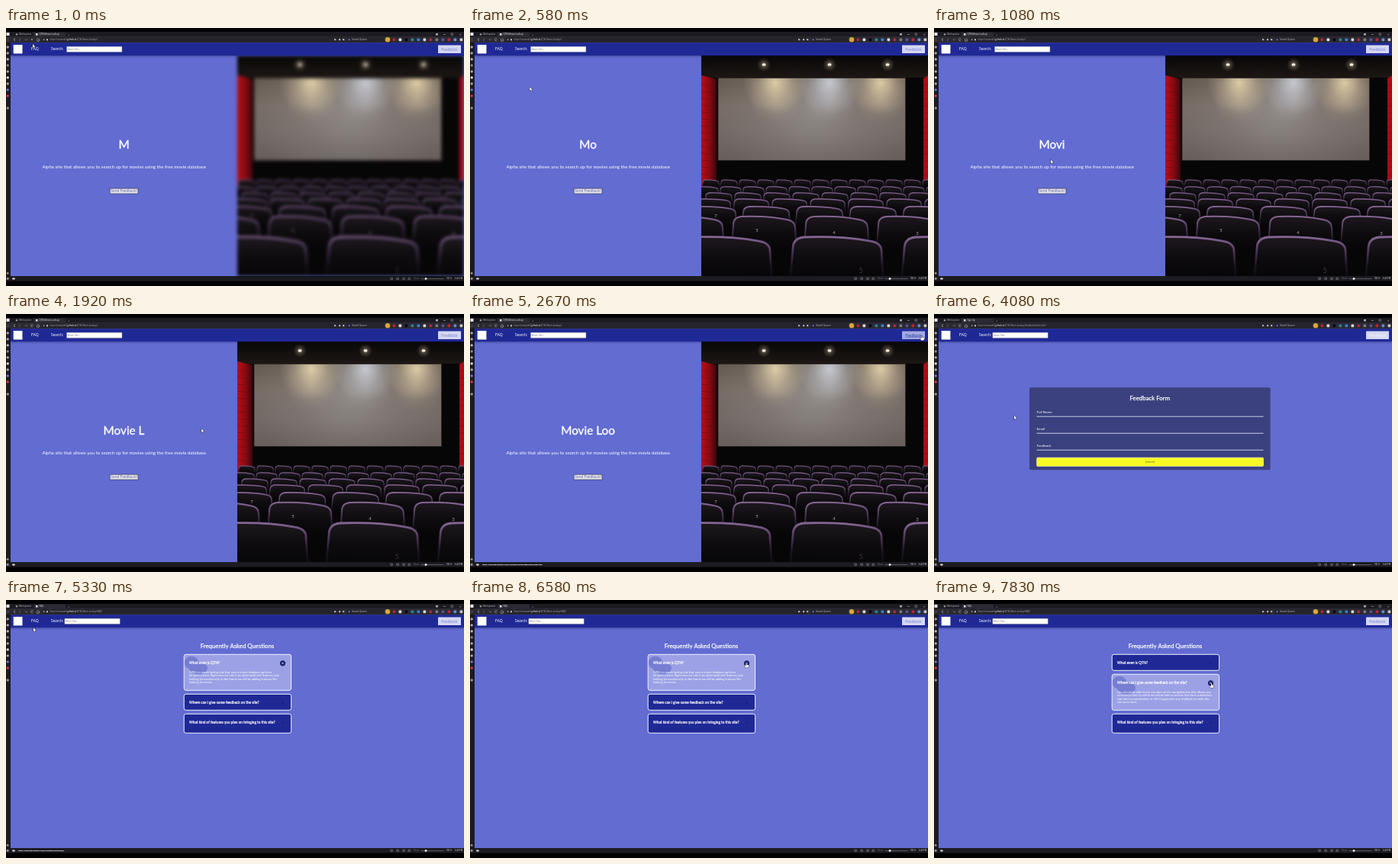
Write an HTML page with a canvas that moves like this. It is 600x338 px and loops after 8000 ms.

```html
<!DOCTYPE html>
<html lang="en">
<head>
<meta charset="utf-8">
<title>Movie Lookup</title>
<style>
html, body { margin: 0; width: 100%; height: 100%; overflow: hidden; background: #000; }
canvas { display: block; width: 100vw; height: 100vh; }
</style>
</head>
<body>
<canvas id="stage"></canvas>
<script>
const W = 600, H = 338, LOOP = 8000;
const SHARP_AT = 350, FEEDBACK_AT = 2950, FAQ_AT = 5150, CLOSE_AT = 6820, OPEN_AT = 7480;
const SITE = '/QTN-Movie-Lookup/', HEADLINE = 'Movie Lookup';
const PAGE = '#626cd1', NAVY = '#1f2996';
const UI = '"Open Sans", sans-serif', BODY = 'Lato, sans-serif';

const canvas = document.getElementById('stage');
const scale = window.devicePixelRatio || 1;
canvas.width = W * scale;
canvas.height = H * scale;
let c = canvas.getContext('2d');
c.scale(scale, scale);

function rect(x, y, w, h, fill) {
  c.fillStyle = fill;
  c.fillRect(x, y, w, h);
}

function box(x, y, w, h, r, fill, stroke, line = 1) {
  c.beginPath();
  c.roundRect(x, y, w, h, r);
  if (fill) { c.fillStyle = fill; c.fill(); }
  if (stroke) { c.strokeStyle = stroke; c.lineWidth = line; c.stroke(); }
}

function disc(x, y, r, fill, ry = r) {
  c.fillStyle = fill;
  c.beginPath();
  c.ellipse(x, y, r, ry, 0, 0, 7);
  c.fill();
}

function path(points, stroke, line) {
  c.beginPath();
  points.forEach(([x, y]) => c.lineTo(x, y));
  c.strokeStyle = stroke;
  c.lineWidth = line;
  c.stroke();
}

function polygon(points, fill) {
  c.fillStyle = fill;
  c.beginPath();
  points.forEach(([x, y]) => c.lineTo(x, y));
  c.fill();
}

// "heavy" thickens the regular weight without changing its widths
function text(str, x, y, size, color, { align = 'left', font = BODY, heavy = 0 } = {}) {
  c.font = `${size}px ${font}`;
  c.textAlign = align;
  c.fillStyle = color;
  c.fillText(str, x, y);
  if (heavy) {
    c.strokeStyle = color;
    c.lineWidth = heavy;
    c.lineJoin = 'round';
    c.strokeText(str, x, y);
  }
  return c.measureText(str).width;
}

// ---- cinema picture, drawn once ----
function gradient(x0, y0, x1, y1, ...colors) {
  const g = c.createLinearGradient(x0, y0, x1, y1);
  colors.forEach((color, i) => g.addColorStop(i / (colors.length - 1), color));
  return g;
}

function glow(x, y, r, rgb, alpha) {
  const g = c.createRadialGradient(x, y, 0, x, y, r);
  g.addColorStop(0, `rgba(${rgb},${alpha})`);
  g.addColorStop(0.5, `rgba(${rgb},${alpha * 0.35})`);
  g.addColorStop(1, `rgba(${rgb},0)`);
  rect(x - r, y - r, 2 * r, 2 * r, g);
}

function seat(x, y, w, h) {
  const r = w * 0.13, right = x + w;
  c.beginPath();
  c.moveTo(x - w * 0.03, y + h);
  c.lineTo(x, y + r);
  c.quadraticCurveTo(x, y + 1, x + r, y);
  c.quadraticCurveTo(x + w * 0.55, y - h * 0.03, right - r, y + h * 0.09);
  c.quadraticCurveTo(right, y + h * 0.13, right, y + h * 0.32);
  c.lineTo(right + w * 0.02, y + h);
  c.fillStyle = gradient(0, y, 0, y + h, '#1d181e', '#0d0b0e', '#060506');
  c.fill();
  c.strokeStyle = gradient(0, y, 0, y + h, '#866594', '#4a3656', '#1a141e', '#0d0a0f');
  c.lineWidth = 0.7 + w * 0.018;
  c.stroke();
}

function drawCinema() {
  rect(303, 36, 297, 289, '#070607');
  rect(303, 36, 297, 29, gradient(0, 36, 0, 65, '#080707', '#1d1714'));
  polygon([[303, 62], [323, 67], [323, 200], [303, 207]], gradient(303, 0, 323, 0, '#b80e17', '#8c0b12', '#3a070a'));
  polygon([[594, 66], [600, 62], [600, 210], [594, 204]], '#a80d17');
  for (let y = 76; y < 200; y += 9) {
    path([[303, y - 2], [320, y]], '#740910', 0.6);
    path([[594, y], [600, y - 2]], '#740910', 0.6);
  }
  c.save();
  c.beginPath();
  c.rect(325, 65.5, 245.5, 108);
  c.clip();
  rect(325, 65, 246, 109, gradient(0, 65, 0, 174, '#64594f', '#776c65', '#736a66', '#675e5b'));
  glow(450, 105, 125, '165,162,160', 0.55);
  [[400, '238,218,176'], [471, '208,213,224'], [538, '238,218,176']].forEach(([x, rgb]) => {
    glow(x, 72, 42, rgb, 0.85);
    glow(x, 92, 36, rgb, 0.3);
  });
  c.restore();
  box(325, 65.5, 245.5, 108, 0, null, '#2b2524', 0.8);
  [385, 471, 547].forEach(x => {
    glow(x, 48, 9, '240,220,190', 0.5);
    disc(x, 48, 2.5, '#fff3dc', 1.8);
  });
  // top, pitch, width, height, first x
  [[199, 24, 21, 13, 305], [208, 30, 27, 15, 298], [216, 38, 34, 17, 309],
   [224, 50, 45, 20, 296], [234, 70, 60, 28, 288], [247, 95, 81, 46, 250],
   [274, 146, 116, 56, 277]].forEach(([y, pitch, w, h, first]) => {
    for (let x = first; x < 600; x += pitch) seat(x, y, w, h);
  });
  [['7', 322, 248], ['5', 376, 267], ['4', 477, 270], ['3', 586, 271]].forEach(([n, x, y]) =>
    text(n, x, y, 6, '#aaa5ae', { align: 'center' }));
  text('5', 512, 321, 9, '#39343d', { align: 'center' });
}

function cinemaLayer(source) {
  const layer = document.createElement('canvas');
  layer.width = canvas.width;
  layer.height = canvas.height;
  const main = c;
  c = layer.getContext('2d');
  if (source) {
    c.filter = `blur(${2 * scale}px)`;
    c.drawImage(source, 0, 0);
  } else {
    c.scale(scale, scale);
    c.beginPath();
    c.rect(303, 36, 297, 289);
    c.clip();
    drawCinema();
  }
  c = main;
  return layer;
}
const sharpCinema = cinemaLayer(), softCinema = cinemaLayer(sharpCinema);

// ---- browser frame ----
function address(x, y, size, tail, color, heavy = 0) {
  const parts = [['https://orvandell.', color], ['github.io', '#fff'], [SITE + tail, color]];
  for (const [part, fill] of parts) x += text(part, x, y, size, fill, { font: UI, heavy });
}

function drawBrowser(page, t, status) {
  const ui = { font: UI }, grey = '#b9b9c2';
  rect(0, 0, W, H, '#000');
  rect(0, 5, W, 6, '#1c1b22');
  rect(0, 11, W, 8.5, '#2b2a33');
  rect(0, 19.5, 6, 312, '#1c1b22');
  rect(0, 325, W, 6.5, '#1c1b22');

  rect(0.5, 6, 4, 4, '#e7e7ea');
  rect(36, 5.5, 42, 5.5, '#2b2a33');
  disc(14, 8.2, 1.2, '#999');
  text('Workspaces', 17, 9.3, 2.9, grey, ui);
  rect(39, 7, 2.6, 2.6, '#ddd');
  text({ home: 'QTN-Movie-Lookup', feedback: 'Sign Up', faq: 'FAQ' }[page], 43.5, 9.3, 2.9, '#f3f3f5', ui);
  text('+', 81, 9.5, 4, grey, ui);
  rect(563, 7, 3, 2.5, '#aaa');
  rect(573, 8.4, 3, 0.5, '#ccc');
  box(583, 7, 2.4, 2.4, 0, null, '#ccc', 0.4);
  text('×', 594, 9.8, 4, '#ddd', ui);

  text('‹', 2, 17, 5, grey, ui);
  path([[12, 13.5], [10, 15.3], [12, 17]], '#ddd', 0.6);
  path([[17, 13.5], [19, 15.3], [17, 17]], '#777', 0.6);
  path([[25, 14.5], [26.5, 16.2], [28, 14.5]], grey, 0.5);
  if (t < SHARP_AT) text('×', 32.5, 17, 5, '#ddd', ui);
  else {
    c.beginPath();
    c.arc(34, 15.3, 1.5, 0.5, 6);
    c.strokeStyle = '#ddd';
    c.lineWidth = 0.5;
    c.stroke();
  }
  path([[40, 15.5], [42, 13.5], [44, 15.5], [43.3, 15.5], [43.3, 17.2], [40.7, 17.2], [40.7, 15.5]], '#ddd', 0.5);
  box(47, 12, 396, 6.6, 1, '#25242c');
  disc(49.7, 15.3, 1, '#999');
  rect(53, 14.2, 2, 2.2, '#bbb');
  address(57.5, 16.4, 2.85, { home: '', feedback: 'feedback/index.html', faq: 'FAQ/' }[page], '#a7a7b0');
  [431, 437, 442].forEach(x => rect(x - 1, 14.2, 2.2, 2, grey));
  box(446, 12, 49, 6.6, 1, '#25242c');
  disc(449.5, 15.3, 1.1, '#6a7ccc');
  text('Search Quovin', 453, 16.4, 2.9, '#c9c9d0', ui);
  disc(500, 15.3, 3.2, '#d9a63b');
  ['#a52830', '#dedee2', '#08080a', '#24869b', '#4279c9', '#d6d7e2', '#b62430', '#777984', '#4a579a',
   '#b32736', '#5c8ee8', '#c7c7ce'].forEach((color, i) => box(506.5 + i * 8, 13.6, 3.7, 3.7, 1, color));

  ['#aaa', '#aaa', '#bbb', '#888', '#aaa', '#ddd', '#aaa', '#617bdc', '#e6324b', null, '#999']
    .forEach((color, i) => color && box(0.8, 23.4 + i * 8, 3, 3, 1, color));
  disc(2.2, 321.3, 1.4, '#999');
  rect(0.8, 327, 2.8, 2.6, '#999');
  disc(10, 328.4, 1.8, '#ddd', 1.2);
  if (status) address(16, 329.4, 2.5, status, '#fff', 0.15);
  [505, 513, 521, 528].forEach(x => box(x - 1.2, 327.2, 2.6, 2.2, 0.3, null, '#bbb', 0.5));
  text('Reset', 534, 329.4, 2.7, '#777', ui);
  rect(543.5, 328.2, 30, 0.6, '#888');
  disc(550, 328.5, 1.4, '#eee');
  text('100 %', 576.5, 329.4, 2.7, '#ddd', ui);
  text('6:40 PM', 588, 329.4, 2.7, '#ddd', ui);
}

// ---- site ----
function drawNav(page, hover) {
  c.save();
  c.shadowColor = 'rgba(15,18,70,.6)';
  c.shadowBlur = 3 * scale;
  c.shadowOffsetY = scale;
  rect(6, 19.5, 594, 16.5, NAVY);
  c.restore();
  rect(9.7, 22, 11.8, 11.5, '#fff');
  text('FAQ', 33, 29.2, 4.9, '#fff');
  text('Search:', 59, 29.2, 5, '#fff');
  const x = page === 'home' ? 79.5 : 76.8;
  box(x, 24.2, 72.5, 7.2, 0.4, '#fff', '#777', 0.4);
  text('Movie Title...', x + 1.2, 28.8, 2.8, '#777', { font: UI });
  box(566, 22.4, 30, 10.7, 0.5, hover ? '#a3aae2' : '#d5d8f2');
  text('Feedback', 581, 29.7, 5.1, hover ? '#303aa0' : page === 'feedback' ? '#f2f3fc' : '#7983d1', { align: 'center' });
  if (hover) rect(570.3, 30.4, 21.4, 0.4, '#303aa0');
}

function drawHome(t) {
  const center = { align: 'center' };
  const typed = HEADLINE.slice(0, 1 + Math.floor(t / 300));
  text(typed, 154.5, 158.4, 15.3, '#fff', { ...center, heavy: 0.35 });
  text('Alpha site that allows you to search up for movies using the free movie database',
    154.7, 183.8, 6.12, '#fff', center);
  box(136.2, 210.2, 36.8, 6.8, 0.4, '#e6e6ee', '#2d2d42', 0.6);
  text('Send Feedback!', 154.6, 215.4, 5, '#656b9e', center);
  c.drawImage(t < SHARP_AT ? softCinema : sharpCinema, 0, 0, W, H);
}

function drawFeedback() {
  box(125, 96.2, 315.6, 108, 2, '#3b417f');
  text('Feedback Form', 282.8, 113.3, 7.85, '#fff', { align: 'center', heavy: 0.25 });
  ['Full Name', 'Email', 'Feedback'].forEach((label, i) => {
    text(label, 134.5, 130 + i * 22, 4.6, '#fff');
    rect(134.5, 133.8 + i * 22, 297, 0.8, '#e9e9f2');
  });
  box(134.7, 188.2, 296.8, 11.2, 1.2, '#f7f922', '#fdfec0', 0.7);
  text('Submit', 283, 195.4, 4, '#77782c', { align: 'center' });
}

const questions = [
  { title: 'What even is QTN?', closed: 21, answer: [
    'QTN is a movie lookup site that uses a movie database api from',
    'an open source. Right now our site is an alpha build and features only',
    'looking for movies only. In the future we will be adding features like',
    'looking for actors.'] },
  { title: 'Where can I give some feedback on the site?', closed: 21, answer: [
    'You should be able to see a button on the navigation bar that allows you',
    'to access a form in which we will be able to receive that form submission',
    "and take in consideration it. We'd appreciate any feedback to make this",
    'site more nicer.'] },
  { title: 'What kind of features you plan on bringing to this site?', closed: 25 }
];

function drawFaq(t) {
  text('Frequently Asked Questions', 303, 62.5, 7.8, '#fff', { align: 'center', heavy: 0.25 });
  const openItem = t < CLOSE_AT ? 0 : t < OPEN_AT ? -1 : 1;
  let y = 71.3;
  questions.forEach(({ title, closed, answer }, i) => {
    const open = i === openItem, h = open ? 47 : closed;
    box(233.2, y, 140.4, h, 2.5, open ? '#9ba1e4' : NAVY);
    if (open) {
      c.save();
      c.clip();
      disc(243, y + 11, 9.5, '#767ed2', 8.5);
      disc(252, y + 18, 12, '#767ed2', 8);
      c.restore();
    }
    box(233.2, y, 140.4, h, 2.5, null, '#f1f2ff', 1);
    text(title, 240, y + 12.4, 4.7, '#fff', { heavy: 0.2 });
    const my = y + 11.5;
    if (open) {
      answer.forEach((line, n) => text(line, 240, y + 24.2 + n * 4.5, 3.9, '#fff'));
      disc(362.5, my, 3.6, '#1c246f');
      path([[361.4, my - 1.1], [363.6, my + 1.1]], '#fff', 0.7);
      path([[363.6, my - 1.1], [361.4, my + 1.1]], '#fff', 0.7);
    } else {
      path([[360.8, my - 0.6], [362.5, my + 0.8], [364.2, my - 0.6]], '#10164f', 0.8);
    }
    y += h + 5;
  });
}

// ---- pointer: time, x, y ----
const route = [[0, 35, 21], [250, 38, 26], [1080, 153, 172.5], [1700, 175, 180], [2480, 590, 28],
  [2670, 591.5, 28.5], [3050, 591, 29], [3650, 310, 178], [4080, 105, 133], [4350, 100, 125],
  [4850, 37, 28], [5150, 37, 28], [5330, 36, 36.5], [5900, 40, 42], [6450, 361.5, 82.5],
  [6900, 361.5, 82.5], [7300, 363, 109], [8000, 363, 109]];

function pointerAt(t) {
  const i = route.findIndex(([time]) => time > t);
  const [t0, x0, y0] = route[i - 1], [t1, x1, y1] = route[i];
  const k = (t - t0) / (t1 - t0), e = k * k * (3 - 2 * k);
  return [x0 + (x1 - x0) * e, y0 + (y1 - y0) * e];
}

function drawPointer(t) {
  const hand = (t > 2430 && t < 3100) || (t > 4800 && t < 5200) || t > 6430;
  const shape = hand
    ? [[0, 0], [0.9, 0], [0.9, 2.2], [3.4, 2.8], [3.4, 4.6], [2.6, 6], [-0.4, 6], [-1.9, 3.6], [-1.2, 3.1], [0, 4]]
    : [[0, 0], [0, 4.7], [1.1, 3.8], [1.9, 5.5], [2.7, 5.1], [2, 3.5], [3.4, 3.4]];
  const [x, y] = pointerAt(t);
  const points = shape.map(([dx, dy]) => [x + dx, y + dy]);
  path([...points, points[0]], '#111', 0.8);
  polygon(points, '#fff');
}

function draw(t) {
  const page = t < FEEDBACK_AT ? 'home' : t < FAQ_AT ? 'feedback' : 'faq';
  const hover = t > 2430 && t < 3100;
  const status = hover ? 'feedback/index.html' : t > 4800 && t < 5600 ? 'FAQ/' : '';
  drawBrowser(page, t, status);
  rect(6, 19.5, 594, 305.5, PAGE);
  if (page === 'home') drawHome(t);
  else if (page === 'feedback') drawFeedback();
  else drawFaq(t);
  drawNav(page, hover);
  drawPointer(t);
}

function frame() {
  draw(performance.now() % LOOP);
  requestAnimationFrame(frame);
}
frame();
</script>
</body>
</html>
```
